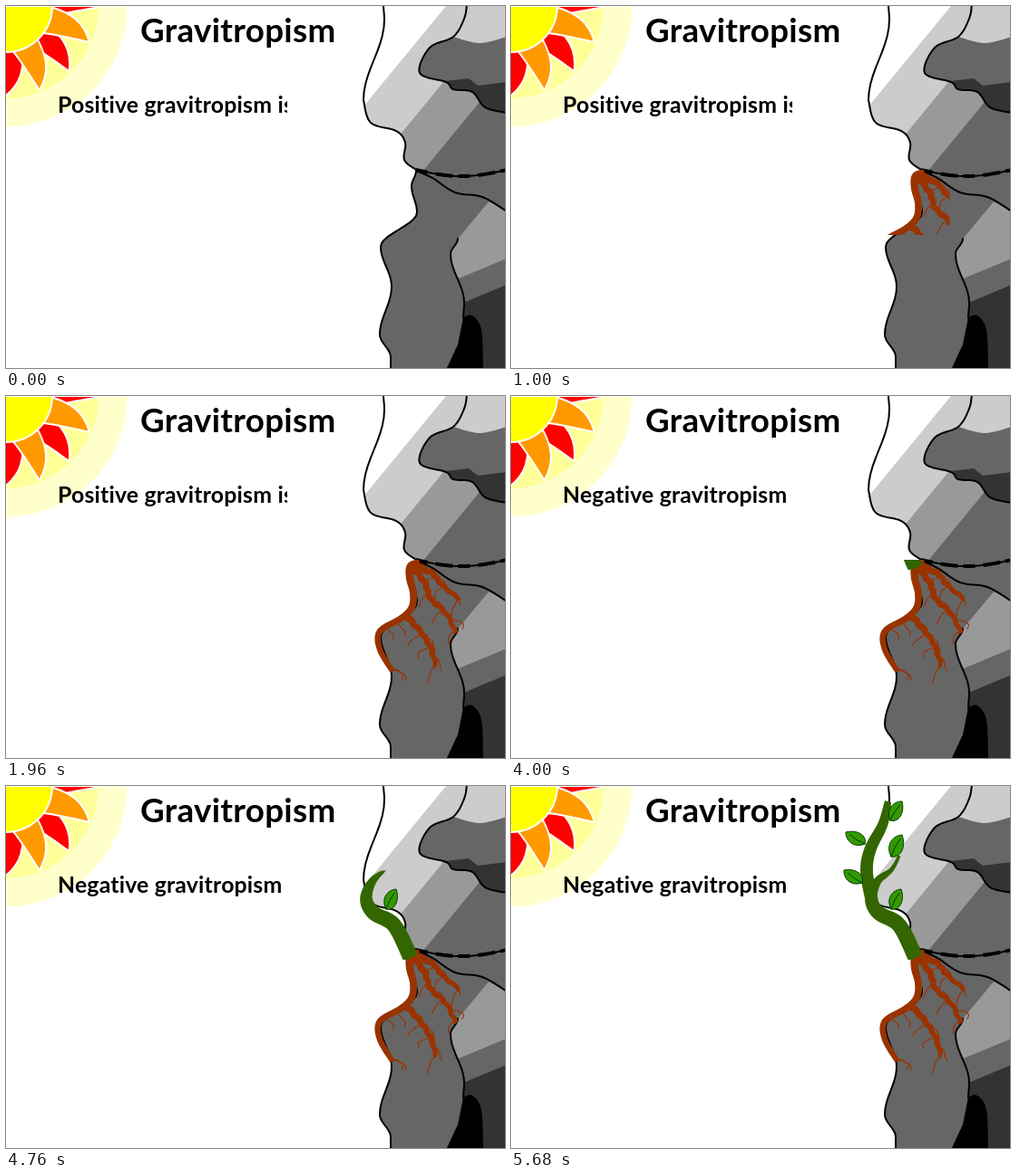
These frames come from a looping animation (550 by 400 pixels, 8000 ms). An HTML page with a canvas:

```html
<!DOCTYPE html>
<html lang="en">
<head>
<meta charset="utf-8">
<title>Gravitropism</title>
<style>
  html, body { margin: 0; width: 100%; height: 100%; overflow: hidden; background: #fff; }
  canvas { display: block; width: 550px; height: 400px; }
</style>
</head>
<body>
<canvas id="stage" width="550" height="400"></canvas>
<script>
const W = 550, H = 400, LOOP = 8000, STEP = 40;
const ctx = document.getElementById('stage').getContext('2d');
const ROOT = '#993300', STEM = '#336600', LEAF = '#339900', VEIN = '#063900';

let seed = 7;
const rnd = () => (seed = (seed * 16807) % 2147483647) / 2147483647;
const mix = (a, b, u) => a + (b - a) * u;
const pairs = list => Array.from({ length: list.length / 2 }, (_, i) => list.slice(2 * i, 2 * i + 2));

// Catmull-Rom curve through key points
function spline(list, n = 8) {
  const p = pairs(list), out = [];
  for (let i = 0; i < p.length - 1; i++) {
    const a = p[i - 1] || p[i], b = p[i], c = p[i + 1], d = p[i + 2] || c;
    for (let j = 0; j < n; j++) {
      const u = j / n;
      out.push([0, 1].map(k => b[k] + 0.5 * u * (c[k] - a[k] +
        u * (2 * a[k] - 5 * b[k] + 4 * c[k] - d[k] +
        u * (3 * (b[k] - c[k]) + d[k] - a[k])))));
    }
  }
  return out.concat([p[p.length - 1]]);
}

// Downward curve that eases between its leftmost and rightmost points
function sway(list, n = 10) {
  const p = pairs(list), out = [p[0]];
  for (let i = 1; i < p.length; i++)
    for (let j = 1; j <= n; j++) {
      const ease = (1 - Math.cos(Math.PI * j / n)) / 2;
      out.push([mix(p[i - 1][0], p[i][0], ease), mix(p[i - 1][1], p[i][1], j / n)]);
    }
  return out;
}

function pathOf(points, close) {
  const path = new Path2D();
  points.forEach(([x, y]) => path.lineTo(x, y));
  if (close) path.closePath();
  return path;
}

const shape = (points, corners = []) => pathOf(points.concat(pairs(corners)), true);
const poly = (...list) => shape(pairs(list));

// Tapered branch; a higher power keeps it thick for longer
function limb(points, w0, w1, power = 1, kink = 0) {
  const left = [], right = [], last = points.length - 1;
  points.forEach(([x, y], i) => {
    const a = points[Math.max(0, i - 1)], b = points[Math.min(last, i + 1)];
    const dx = b[0] - a[0], dy = b[1] - a[1], len = Math.hypot(dx, dy) || 1;
    const w = mix(w0, w1, (i / last) ** power) / 2, shift = kink * Math.sin(i * 1.4);
    left.push([x - dy / len * (shift + w), y + dx / len * (shift + w)]);
    right.unshift([x - dy / len * (shift - w), y + dx / len * (shift - w)]);
  });
  return pathOf(left.concat(right), true);
}

function fill(path, color) {
  ctx.fillStyle = color;
  ctx.fill(path);
}

function line(path, color = '#000', width = 2) {
  ctx.strokeStyle = color;
  ctx.lineWidth = width;
  ctx.stroke(path);
}

function clipped(path, draw) {
  ctx.save();
  ctx.clip(path);
  draw();
  ctx.restore();
}

function box(x, y, w, h) {
  const path = new Path2D();
  path.rect(x, y, Math.max(0, w), Math.max(0, h));
  return path;
}

// Cliff
const upperEdge = sway([416, -2, 417, 15, 394, 104])
  .concat(spline([394, 104, 402, 129, 430, 138, 440, 151, 439, 170, 452, 181]));
const crack = Array.from({ length: 21 }, (_, i) => [452 + 5 * i, 181 + 7 * Math.sin(Math.PI * i / 20)]);
const lowerEdge = sway([452, 182, 447, 199, 453, 228, 413, 266, 425, 310, 412, 363, 424, 388, 424, 402]);
const caveEdge = spline([508, -2, 505, 14, 493, 34, 467, 46, 456, 74, 485, 84, 493, 92, 514, 95, 528, 112, 552, 118]);
const ledge = spline([452, 182, 470, 190, 495, 206, 525, 211, 552, 227]);
const innerEdge = sway([498, 257, 490, 274, 505, 328, 504, 345]);

const edges = [upperEdge, crack, lowerEdge, caveEdge, ledge, innerEdge].map(e => pathOf(e));
const upper = shape(upperEdge.concat(crack), [552, -2]);
const lower = shape(lowerEdge.concat([[552, 402]], [...crack].reverse()));
const cave = shape(caveEdge, [552, -2]);
const caveTop = shape(spline([493, 34, 522, 41, 552, 34]), [552, -2, 508, -2]);
const inner = shape(innerEdge, [504, 402, 552, 402, 552, 226, 532, 216]);
const hole = shape(spline([504, 344, 514, 342, 524, 358, 526, 402]), [485, 402, 498, 374]);

function drawCliff() {
  clipped(upper, () => {
    fill(upper, '#fff');
    for (const [x, color] of [[485, '#ccc'], [551, '#999'], [609, '#666']])
      fill(poly(x, 0, W + 80, 0, W + 80, 200, x - 164, 200), color);
    clipped(cave, () => {
      fill(cave, '#666');
      fill(caveTop, '#ccc');
      fill(poly(484, 83, 510, 80, 520, 88, 552, 84, 552, 120, 484, 120), '#333');
    });
  });
  fill(lower, '#666');
  clipped(inner, () => {
    fill(inner, '#999');
    for (const [y, color] of [[309, '#666'], [338, '#333']])
      fill(poly(480, y, 552, y - 30, 552, 402, 480, 402), color);
  });
  fill(hole, '#000');
  edges.forEach(e => line(e));
  ctx.save();
  ctx.lineCap = 'butt';
  ctx.setLineDash([13, 9, 19, 6]);
  line(edges[1], '#000', 4);
  ctx.restore();
}

// Sun: one flame turned by steps, orange over red
const flame = new Path2D('M49 -16 C68 -17 86 -14 100 6 C85 8 65 10 49 14 Z');

function ray(deg, color) {
  ctx.save();
  ctx.rotate(deg * Math.PI / 180);
  fill(flame, color);
  line(flame, '#fff', 2);
  ctx.restore();
}

function disc(r) {
  const path = new Path2D();
  path.arc(0, 0, r, 0, 2 * Math.PI);
  return path;
}

function drawSun() {
  fill(disc(133.5), '#ffc');
  fill(disc(102), '#ff9');
  for (let i = 0; i < 3; i++) ray(-2.5 + 45 * i, '#f00');
  for (let i = 0; i < 2; i++) ray(20 + 45 * i, '#f90');
  fill(disc(51), '#ff0');
  line(disc(51), '#fff', 2);
}

// Roots
const mainRoot = spline([456, 185, 446, 188, 445, 201, 449, 218, 447, 234, 435, 246, 412, 260, 412, 280, 426, 304]);
const sideRoots = [
  [450, 187, 470, 196, 480, 208, 500, 225],
  [450, 191, 462, 207, 468, 224, 485, 240, 496, 262],
  [441, 243, 455, 258, 467, 276, 474, 299]
].map(list => spline(list));
const roots = [limb(mainRoot, 9, 6),
  ...sideRoots.map(r => limb(r, 8, 5, 1, 0.9))];

// Fine root that turns downward as it grows
function rootlet([x, y], side) {
  const pts = [x, y];
  for (let i = 0; i < 4; i++) {
    const a = side * (1.3 - 0.4 * i) + rnd() - 0.5, len = 4 + 2 * rnd();
    pts.push(x += Math.sin(a) * len, y += Math.cos(a) * len);
  }
  return pathOf(spline(pts, 4));
}

const rootlets = [0.66, 0.74, 0.98, 1].map(u => rootlet(mainRoot[Math.round(u * (mainRoot.length - 1))], 1));
for (const r of sideRoots)
  for (let i = 0; i < 5; i++)
    rootlets.push(rootlet(r[Math.round((0.4 + 0.15 * i) * (r.length - 1))], i % 2 ? 1 : -1));

function drawRoots() {
  roots.forEach(p => fill(p, ROOT));
  rootlets.forEach(p => line(p, ROOT, 1.2));
}

// Shoot
const stemLow = limb(spline([446, 190, 428, 154, 405, 140, 397, 124, 404, 105, 419, 92]), 17, 1, 3);
const stemTop = limb(spline([398, 128, 392, 95, 396, 70, 410, 42, 415.5, 17]), 14, 7, 3);
const twig = limb(spline([402, 107, 419, 93, 428, 77]), 7, 3);

function leaf(bx, by, tx, ty) {
  const dx = tx - bx, dy = ty - by;
  const at = (u, v) => [bx + dx * u - dy * v, by + dy * u + dx * v];
  const blade = new Path2D(), vein = new Path2D();
  blade.moveTo(bx, by);
  blade.bezierCurveTo(...at(0.1, 0.4), ...at(0.65, 0.37), tx, ty);
  blade.bezierCurveTo(...at(0.8, -0.34), ...at(0.3, -0.43), bx, by);
  vein.moveTo(bx, by);
  vein.quadraticCurveTo(...at(0.4, -0.07), ...at(0.8, 0));
  fill(blade, LEAF);
  line(blade, VEIN, 1);
  line(vein, VEIN, 1);
}

function drawLowShoot() {
  fill(stemLow, STEM);
  leaf(419, 136, 430, 114);
}

function drawTopShoot() {
  fill(stemTop, STEM);
  fill(twig, STEM);
  leaf(390, 64, 369, 51);
  leaf(387, 107, 367, 93);
  leaf(418, 38, 431, 17);
  leaf(419, 78, 431, 54);
}

// Spacing also keeps letter pairs from joining
function text(str, x, y, size, spacing) {
  ctx.font = `bold ${size}px Lato, "Open Sans", sans-serif`;
  ctx.letterSpacing = spacing + 'px';
  ctx.fillStyle = '#000';
  ctx.fillText(str, x, y);
}

// Each growth stage uncovers its part in equal steps
function draw(t) {
  const s = Math.floor(t / STEP), up = s - 99;
  ctx.fillStyle = '#fff';
  ctx.fillRect(0, 0, W, H);
  clipped(box(0, 1, 140, 140), drawSun);
  drawCliff();

  if (s > 0) {
    const n = Math.min(s, 49);
    clipped(box(400, 180, 51 + 1.3 * n, 3 + 2.8 * n), drawRoots);
  }
  if (up > 0) {
    const low = mix(185.6, 89, Math.min(up / 21, 1));
    clipped(box(380, low, 80, 192 - low), drawLowShoot);
  }
  if (up > 21) {
    const top = mix(120, 14, Math.min((up - 21) / 21, 1));
    clipped(box(360, top, 80, 130 - top), drawTopShoot);
  }

  text('Gravitropism', 148, 40, 36.8, 0.28);
  clipped(box(50, 90, 260, 40), () =>
    text(up > 0 ? 'Negative gravitropism' : 'Positive gravitropism is', 57, 118, 24.8, 0.2));
}

ctx.lineJoin = ctx.lineCap = 'round';
const start = performance.now();
function tick() {
  draw((performance.now() - start) % LOOP);
  requestAnimationFrame(tick);
}
tick();
</script>
</body>
</html>
```
